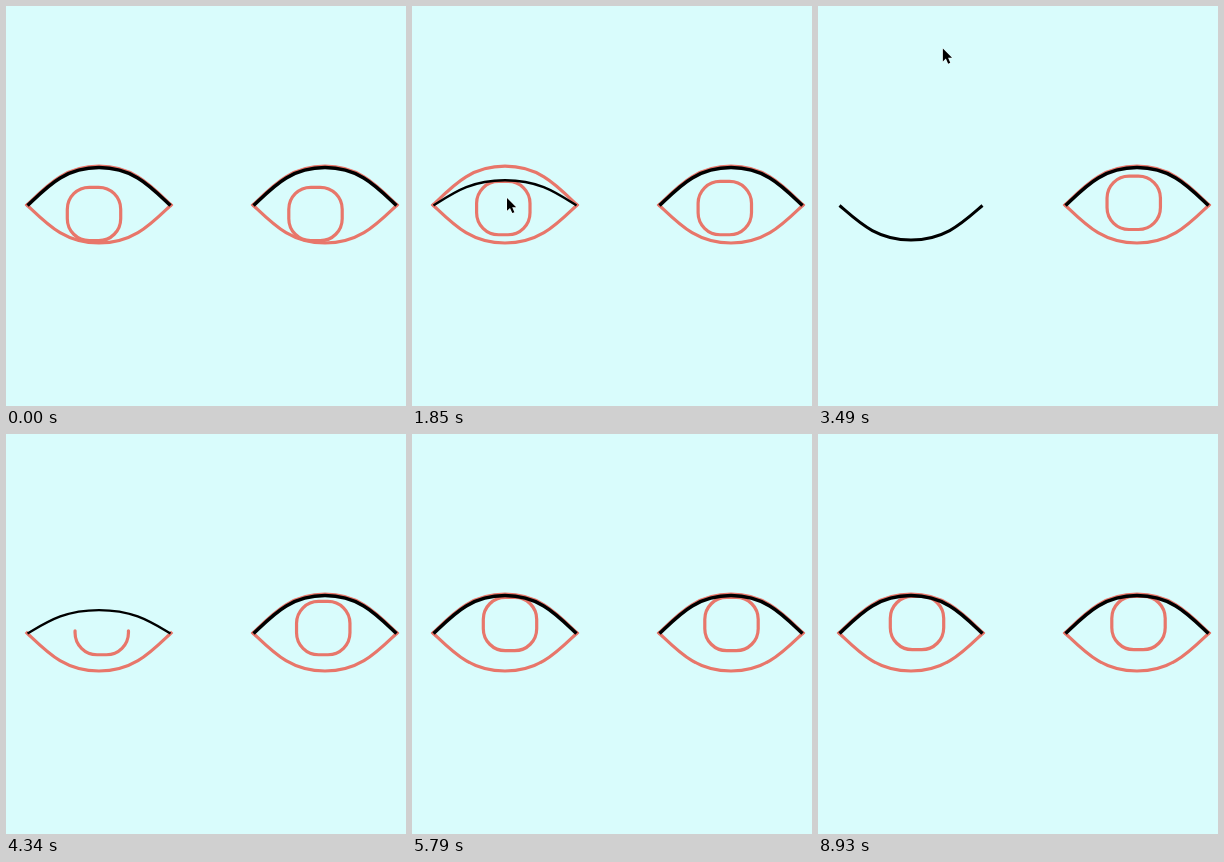
An HTML page for the animation above (8950 ms loop, 400 by 400 pixels).

```html
<!DOCTYPE html>
<html lang="en">
<head>
<meta charset="utf-8">
<title>Winking eyes</title>
<style>
  html, body { margin: 0; width: 100%; height: 100%; overflow: hidden; background: #d9fcfc; }
  svg { display: block; width: 100vw; height: 100vh; }
  .line { fill: none; stroke: #e8766a; stroke-width: 3.2; }
  .lash { fill: none; stroke: #000; }
</style>
</head>
<body>
<svg id="stage" viewBox="0 0 400 400">
  <g id="eyes"></g>
  <path id="cursor" d="M0 0V12.8L3 10L5.3 15.1L7.4 14.2L5.2 9.2H9.2Z"
        fill="#000" stroke="#fff" stroke-width="1" paint-order="stroke"/>
</svg>
<script>
const LOOP = 8950;

const clamp = v => Math.max(0, Math.min(1, v));
const ramp = (t, from, to) => clamp((t - from) / (to - from));
const smooth = u => u * u * (3 - 2 * u);

// One half of the almond outline: a curve over the middle at x = 93.
function lidPath(rise, halfWidth, cornerY) {
  const shoulder = cornerY - rise / 2;
  const apex = cornerY - rise;
  const x = f => 93 + f * halfWidth;
  return `M${x(-1)} ${cornerY}C${x(-0.72)} ${shoulder} ${x(-0.48)} ${apex} 93 ${apex}` +
         `C${x(0.48)} ${apex} ${x(0.72)} ${shoulder} ${x(1)} ${cornerY}`;
}

// A rounded square traced from its top centre.
function irisPath(half, radius) {
  const flat = half - radius;
  const arc = (dx, dy) => `a${radius} ${radius} 0 0 1 ${dx} ${dy}`;
  return `M0 ${-half}h${flat}${arc(radius, radius)}v${2 * flat}${arc(-radius, radius)}` +
         `h${-2 * flat}${arc(-radius, -radius)}v${-2 * flat}${arc(radius, -radius)}z`;
}

function add(parent, tag, attrs) {
  const node = document.createElementNS('http://www.w3.org/2000/svg', tag);
  for (const name in attrs) node.setAttribute(name, attrs[name]);
  return parent.appendChild(node);
}

function makeEye(x, irisShift) {
  const group = add(document.getElementById('eyes'), 'g', { transform: `translate(${x} 0)` });
  const line = (d, cap) => add(group, 'path', { class: 'line', d, 'stroke-linecap': cap });
  const eye = {
    irisShift,
    lower: line(lidPath(-38, 72, 199), 'square'),
    upper: line(lidPath(38.8, 72, 199), 'square'),
    iris: line(irisPath(26.7, 22), 'round'),
    lash: add(group, 'path', { class: 'lash' })
  };
  eye.iris.setAttribute('pathLength', 1);
  return eye;
}

const show = (node, on) => node.setAttribute('visibility', on ? 'visible' : 'hidden');

function drawEye(eye, [x, y], { shut, iris, upper, lower }) {
  eye.iris.setAttribute('transform', `translate(${x + eye.irisShift} ${y})`);
  // The iris outline shrinks towards its lowest point.
  eye.iris.setAttribute('stroke-dasharray', iris < 1 ? `${iris} 2` : 'none');
  eye.iris.setAttribute('stroke-dashoffset', (iris - 1) / 2);
  show(eye.iris, iris > 0);
  show(eye.upper, upper);
  show(eye.lower, lower);
  eye.lash.setAttribute('d', lidPath(38 - 72.5 * shut, 71.5, 199.5));
  eye.lash.setAttribute('stroke-width', 2.2 + 1.3 * clamp(1 - shut / 0.15) + 0.8 * shut);
}

// The gaze drifts up and right, then dips once before settling.
function gazeAt(t) {
  const drift = ramp(t, 0, 5600);
  const dip = ramp(t, 6640, 8450);
  const swing = Math.sin(Math.PI * dip);
  return [88 + 10 * drift + 4 * swing + dip, 208 - 18 * drift + 5.8 * swing - dip];
}

// The pointer comes in from the lower left, lingers on the eye and leaves at the top.
function pointerAt(t) {
  const enter = smooth(ramp(t, 700, 1850));
  const linger = ramp(t, 1850, 2690);
  const leave = ramp(t, 2690, 3900);
  return [-14 + 109 * enter + 10 * linger + 30 * leave,
    368 - 176 * enter - 19 * linger - 197 * leave];
}

function winkAt(t) {
  return {
    shut: smooth(ramp(t, 1680, 2320)) - smooth(ramp(t, 3700, 4600)),
    iris: 1 - ramp(t, 1870, 2250) + ramp(t, 3920, 4820),
    upper: t < 2000 || t > 4600,
    lower: t < 2280 || t > 3780
  };
}

const leftEye = makeEye(0, 0);
const rightEye = makeEye(226, -4.5);
const cursor = document.getElementById('cursor');
const OPEN = { shut: 0, iris: 1, upper: true, lower: true };

function render(t) {
  const gaze = gazeAt(t);
  drawEye(leftEye, gaze, winkAt(t));
  drawEye(rightEye, gaze, OPEN);
  cursor.setAttribute('transform', `translate(${pointerAt(t)})`);
}

const start = performance.now();
function tick() {
  render((performance.now() - start) % LOOP);
  requestAnimationFrame(tick);
}
tick();
</script>
</body>
</html>
```
